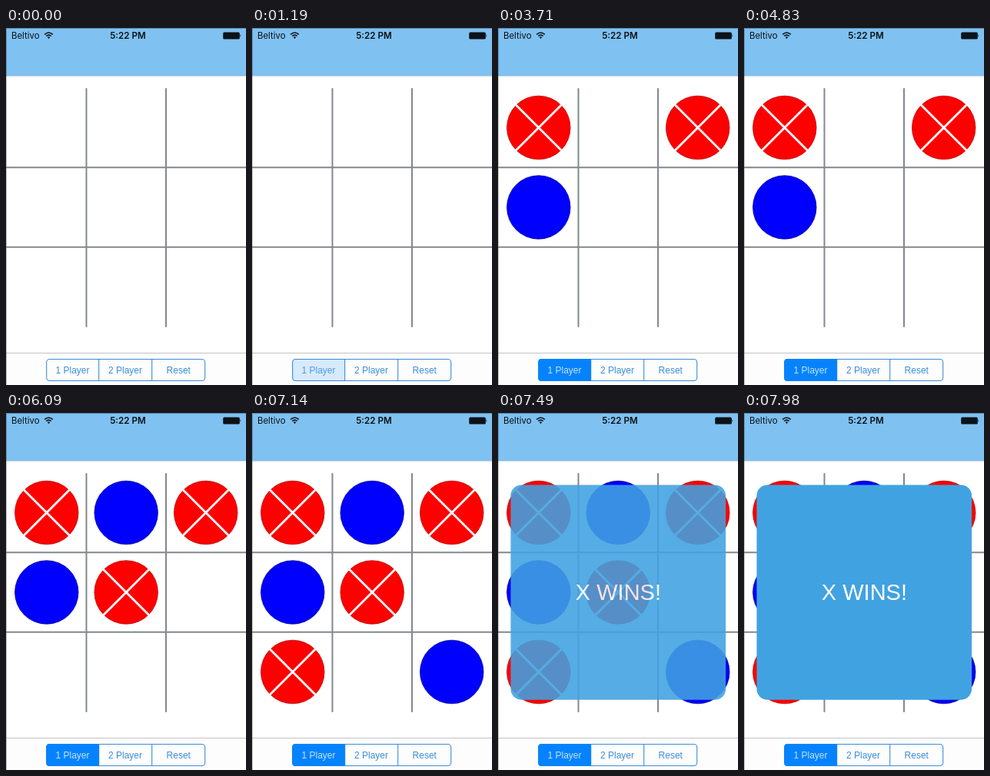
Recreate the animation shown at these times as an HTML page without scripts. Size 312x464 px, loop 8000 ms.

```html
<!DOCTYPE html>
<html lang="en">
<head>
<meta charset="utf-8">
<title>Tic-tac-toe</title>
<style>
html, body { margin: 0; height: 100%; overflow: hidden; background: #fff; }
svg { display: block; width: 100vw; height: 100vh; }

.status { font: 11.4px Inter, sans-serif; fill: #0b1218; }
.clock { font-weight: 600; font-size: 11.7px; text-anchor: middle; }
.grid { stroke: #83888c; stroke-width: 2; stroke-linecap: round; }
.tabs text { font: 12px "Liberation Sans", Arial, sans-serif; text-anchor: middle; fill: #3c8edb; }
.tabs .frame { fill: none; stroke: #3c8edb; stroke-width: 1.1; }
.tabs .on text { fill: #c4e2ff; }
.banner text { font: 29px "Liberation Sans", Arial, sans-serif; text-anchor: middle; fill: #fff; }

/* all parts share one 8 s loop */
.on, .move, .banner { animation: 8s step-end infinite; }
.on { animation-name: select; animation-timing-function: linear; }
.move1 { animation-name: move1; }
.move2 { animation-name: move2; }
.move3 { animation-name: move3; }
.move4 { animation-name: move4; }
.banner { animation-name: banner; }

@keyframes select {
  0%, 14.87% { opacity: 0; }
  14.875%, 15.75% { opacity: .15; }
  20.125%, 100% { opacity: 1; }
}
@keyframes move1 { 0% { opacity: 0; } 16.625%, 100% { opacity: 1; } }
@keyframes move2 { 0% { opacity: 0; } 46.375%, 100% { opacity: 1; } }
@keyframes move3 { 0% { opacity: 0; } 62.125%, 100% { opacity: 1; } }
@keyframes move4 { 0% { opacity: 0; } 88.375%, 100% { opacity: 1; } }
@keyframes banner {
  0% { opacity: 0; }
  90.125% { opacity: .17; }
  91% { opacity: .36; }
  91.875% { opacity: .57; }
  92.75% { opacity: .76; }
  93.625% { opacity: .89; }
  94.5% { opacity: .96; }
  95.375% { opacity: .99; }
  96.25%, 100% { opacity: 1; }
}
</style>
</head>
<body>
<svg viewBox="0 0 312 464" preserveAspectRatio="none">
  <defs>
    <g id="x">
      <circle r="41.3" fill="#fe0000" stroke="#a80000" stroke-width=".7"/>
      <path d="M-29.5-29.5 29.5 29.5M29.5-29.5-29.5 29.5" stroke="#fff" stroke-width="2.8"/>
    </g>
    <circle id="o" r="41.3" fill="#0000fe" stroke="#00007c" stroke-width=".7"/>
  </defs>

  <rect width="312" height="464" fill="#fff"/>

  <!-- status and navigation bar -->
  <rect width="312" height="62" fill="#7fc1f1"/>
  <path d="M0 62.5H312" stroke="#c9d3da"/>
  <g class="status">
    <text x="7" y="14.3">Beltivo</text>
    <text class="clock" x="158.5" y="14.3">5:22 PM</text>
    <g fill="none" stroke="#0b1218" stroke-width="1.6">
      <path d="M50.2 8.4Q55.5 3.6 60.8 8.4M52.2 10.5Q55.5 7.6 58.8 10.5"/>
    </g>
    <path d="M53.7 12Q55.5 10.6 57.3 12L55.5 13.9Z"/>
    <rect x="282.2" y="5.4" width="21.6" height="9.2" rx="1.6"/>
    <path d="M304.5 8.3Q306.2 10 304.5 11.7Z"/>
  </g>

  <!-- board -->
  <path class="grid" d="M104.5 79V388M208 79V388M1 181.3H312M1 284.8H312"/>
  <g class="move move1">
    <use href="#x" x="259.7" y="129.5"/>
  </g>
  <g class="move move2">
    <use href="#o" x="52.8" y="233"/>
    <use href="#x" x="52.8" y="129.5"/>
  </g>
  <g class="move move3">
    <use href="#o" x="156.2" y="129.5"/>
    <use href="#x" x="156.2" y="233"/>
  </g>
  <g class="move move4">
    <use href="#o" x="259.7" y="336.5"/>
    <use href="#x" x="52.8" y="336.5"/>
  </g>

  <!-- toolbar -->
  <rect y="423" width="312" height="41" fill="#fdfdfd"/>
  <path d="M0 422.5H312" stroke="#c4c4c4"/>
  <g class="tabs">
    <text x="86.5" y="449.2">1 Player</text>
    <text x="155" y="449.2">2 Player</text>
    <text x="224.3" y="449.2">Reset</text>
    <path class="frame" d="M120.7 430.5V458.5M189.7 430.5V458.5"/>
    <rect class="frame" x="52.7" y="430.5" width="206" height="28" rx="4"/>
    <g class="on">
      <path d="M121 430H56.5Q52.2 430 52.2 434.3V454.7Q52.2 459 56.5 459H121Z" fill="#0683fc"/>
      <text x="86.5" y="449.2">1 Player</text>
    </g>
  </g>

  <!-- result -->
  <g class="banner">
    <rect x="16.5" y="93.5" width="279.5" height="279.3" rx="14" fill="#41a2e1"/>
    <text x="156.4" y="243.3">X WINS!</text>
  </g>

  <path d="M.5 464V.5H312" fill="none" stroke="#000" stroke-opacity=".28"/>
</svg>
</body>
</html>
```
